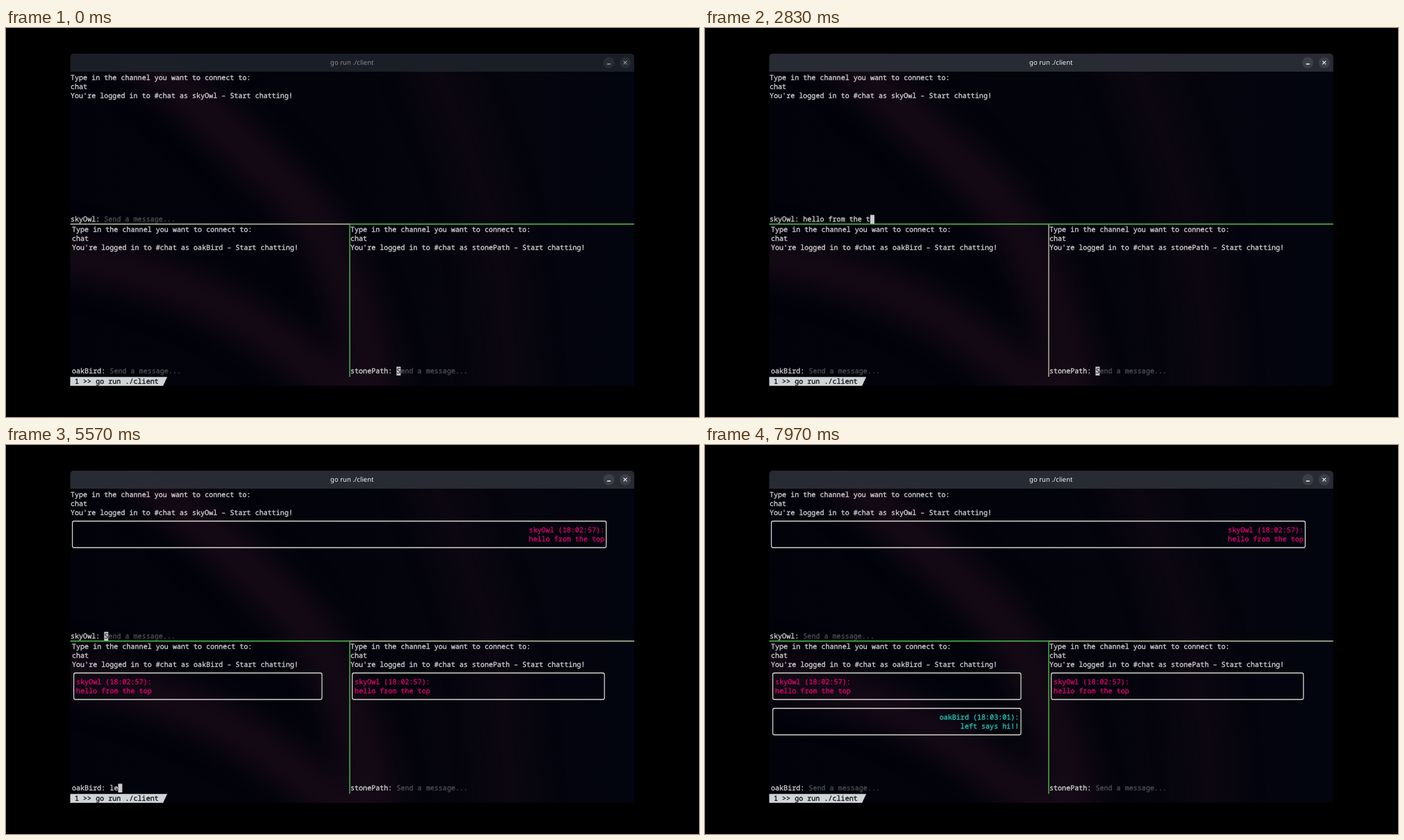
Write an HTML page that moves like this. It is 998x561 px and loops after 8000 ms.

```html
<!DOCTYPE html>
<html lang="en">
<head>
<meta charset="utf-8">
<title>go run ./client</title>
<style>
html, body { margin: 0; width: 100%; height: 100%; overflow: hidden; background: #000; }
svg { display: block; width: 100vw; height: 100vh; }
text { white-space: pre; text-rendering: geometricPrecision; fill: currentColor; }
.mono {
  font: 500 10.07px "Noto Sans Mono", "DejaVu Sans Mono", monospace;
  color: #d0d0cf; stroke: currentColor; stroke-width: .32;
}
.title { font: 500 9.5px "Noto Sans", "Open Sans", sans-serif; text-anchor: middle; }
.frame { fill: none; stroke: #d2d1cc; stroke-width: 1.3; }
</style>
</head>
<body>
<svg id="stage" viewBox="0 0 998 561"></svg>
<script>
const LOOP = 8000, CHAR = 6.04, ROW = 12.75, BLINK = 530;
const GREEN = '#50bd50', PALE = '#b9c0a2';
const PINK = '#d8056f', CYAN = '#22c9ba', GREY = '#4d4e53';
const HINT = 'Send a message...';

// x, y: left edge and first baseline; from: time the idle blink turns on
const panes = [
  { id: 'top', user: 'skyOwl', x: 93, y: 75.3, box: [95.6, 864.4], from: 300,
    text: 'hello from the top', start: 870, step: 130, sent: 3320 },
  { id: 'left', user: 'oakBird', x: 95, y: 294.3, box: [97.6, 455], from: 70,
    text: 'left says hi!!', start: 5350, step: 130, sent: 7800 },
  { id: 'right', user: 'stonePath', x: 496, y: 294.3, box: [498.6, 861.8], from: 595 }
];

const messages = [
  { pane: 0, row: 3, by: 0, clock: '18:02:57', color: PINK, at: 3340 },
  { pane: 1, row: 3, by: 0, clock: '18:02:57', color: PINK, at: 3700 },
  { pane: 2, row: 3, by: 0, clock: '18:02:57', color: PINK, at: 4100 },
  { pane: 1, row: 7, by: 1, clock: '18:03:01', color: CYAN, at: 7850 }
];

const text = (x, y, str, attrs = '') =>
  `<text class="mono" x="${x}" y="${y}" ${attrs}>${str}</text>`;

function backdrop() {
  const band = (d, width, color) =>
    `<path d="${d}" stroke="${color}" stroke-width="${width}"/>`;
  return `
    <defs>
      <filter id="soft" filterUnits="userSpaceOnUse" x="0" y="-40" width="998" height="660"
        color-interpolation-filters="sRGB"><feGaussianBlur stdDeviation="20"/></filter>
      <linearGradient id="night"><stop stop-color="#01020a"/><stop offset=".45" stop-color="#02030b"/>
        <stop offset=".72" stop-color="#06050e"/><stop offset="1" stop-color="#02040e"/></linearGradient>
      <clipPath id="win"><path d="M92.5 516V42a5 5 0 0 1 5-5H899.7a5 5 0 0 1 5 5V516Z"/></clipPath>
    </defs>
    <g clip-path="url(#win)">
      <rect x="92" y="37" width="813" height="480" fill="url(#night)"/>
      <g fill="none" filter="url(#soft)">
        ${band('M150 0Q300 130 400 225T540 560', 66, '#150a15')}
        ${band('M40 320Q250 355 360 430T520 570', 62, '#150a16')}
        ${band('M590 0Q650 120 685 230T730 560', 66, '#0c0711')}
      </g>
      <rect id="bar" x="92" y="37" width="813" height="26" fill-opacity=".92"/>
    </g>
    <text id="title" class="title" x="498.3" y="53.3">go run ./client</text>
    <g id="buttons"><circle cx="868.2" cy="50" r="8"/><circle cx="891.8" cy="50" r="8"/></g>
    <path id="marks" fill="none" stroke-width="1.3" d="M865.7 52h5M889.4 47.6l4.8 4.8m0-4.8l-4.8 4.8"/>`;
}

function paneMarkup(p) {
  const inputX = p.x + (p.user.length + 2) * CHAR;
  const inputY = p.y + 16 * ROW;
  const lines = [
    'Type in the channel you want to connect to:',
    'chat',
    `You're logged in to #chat as ${p.user} – Start chatting!`
  ];
  return lines.map((line, i) => text(p.x, p.y + i * ROW, line)).join('') +
    text(p.x, inputY, p.user + ':') +
    text(inputX, inputY, HINT, `id="${p.id}-hint" style="color:${GREY}"`) +
    text(inputX, inputY, '', `id="${p.id}-input"`) +
    `<rect id="${p.id}-cursor" y="${inputY - 9.8}" width="6" height="12.6" fill="#c9cbcd"/>` +
    text(inputX, inputY, 'S', `id="${p.id}-under" style="color:#3a3b3f"`);
}

function messageMarkup(m, i) {
  const p = panes[m.pane], author = panes[m.by], own = m.pane === m.by;
  const [x1, x2] = p.box;
  const top = p.y + m.row * ROW - 3.8;
  const x = own ? x2 - 2.6 : x1 + 3.5;
  const y = p.y + (m.row + 1) * ROW;
  const style = `style="color:${m.color};text-anchor:${own ? 'end' : 'start'}"`;
  return `<g id="msg${i}">
    <rect class="frame" x="${x1}" y="${top}" width="${x2 - x1}" height="${3 * ROW}" rx="2.5"/>
    ${text(x, y, `${author.user} (${m.clock}):`, style)}${text(x, y + ROW, author.text, style)}</g>`;
}

const stage = document.getElementById('stage');
stage.innerHTML = backdrop() +
  `<g fill="none" stroke-width="1.4">
    <path id="lineL" d="M92.5 282.8H495"/><path id="lineR" d="M495 282.8H904.7"/>
    <path id="lineV" d="M495 283.4V503"/>
  </g>` +
  panes.map(paneMarkup).join('') + messages.map(messageMarkup).join('') +
  `<path d="M92.5 503.2H232.2L226.2 516H92.5Z" fill="#d0d4d7"/>` +
  text(99, 513.2, '1 &gt;&gt; go run ./client', 'style="color:#101318"');

const el = id => document.getElementById(id);
const show = (id, on) => el(id).setAttribute('visibility', on ? 'visible' : 'hidden');
const paint = (id, attr, color) => el(id).setAttribute(attr, color);
const mod = (a, n) => ((a % n) + n) % n;

function cursorOn(p, t) {
  const idle = mod(t - p.from, 2 * BLINK) < BLINK;
  if (!p.text || t < p.start) return idle;
  const last = p.start + (p.text.length - 1) * p.step;
  return t < last || mod(t - last, 2 * BLINK) < BLINK;
}

function drawInput(p, t) {
  const typing = p.text && t >= p.start && t < p.sent;
  const value = typing ? p.text.slice(0, Math.floor((t - p.start) / p.step) + 1) : '';
  const on = cursorOn(p, t);
  el(p.id + '-input').textContent = value;
  el(p.id + '-cursor').setAttribute('x', p.x + (p.user.length + 2 + value.length) * CHAR);
  show(p.id + '-hint', !value);
  show(p.id + '-cursor', on);
  show(p.id + '-under', on && !value);
}

function render(t) {
  const active = t >= 60;
  paint('bar', 'fill', active ? '#2c2e38' : '#1d212a');
  paint('title', 'color', active ? '#f2f2f2' : '#8b8d91');
  paint('buttons', 'fill', active ? '#3d3e46' : '#292c32');
  paint('marks', 'stroke', active ? '#f2f2f2' : '#94969a');

  const focus = t < 250 ? 'right' : t < 4300 ? 'top' : 'left';
  paint('lineL', 'stroke', focus === 'right' ? PALE : GREEN);
  paint('lineR', 'stroke', focus === 'left' ? PALE : GREEN);
  paint('lineV', 'stroke', focus === 'top' ? PALE : GREEN);

  panes.forEach(p => drawInput(p, t));
  messages.forEach((m, i) => show('msg' + i, t >= m.at));
}

const begin = performance.now();
function tick() {
  render((performance.now() - begin) % LOOP);
  requestAnimationFrame(tick);
}
tick();
</script>
</body>
</html>
```
